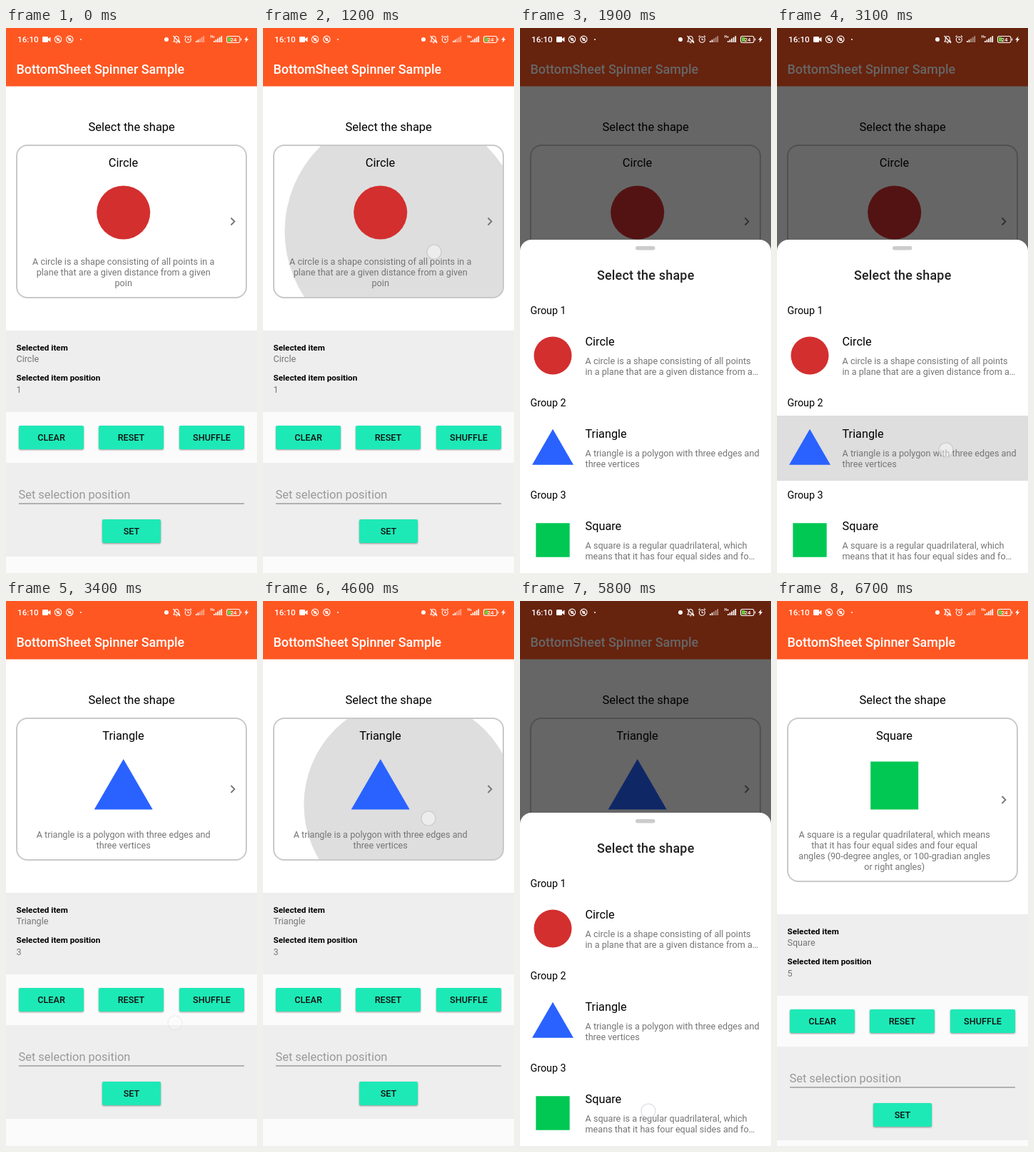
Recreate the animation shown at these times as an HTML page. Size 352 px wide and 762 px high, loop 7100 ms.

```html
<!DOCTYPE html>
<html lang="en">
<head>
<meta charset="utf-8">
<title>BottomSheet Spinner Sample</title>
<style>
  html, body { margin: 0; width: 100%; height: 100%; overflow: hidden; background: #fff; }
  svg { display: block; width: 100vw; height: 100vh; font-family: Roboto, sans-serif; }
  .button { fill: #1de9b6; filter: drop-shadow(0 1px 1.2px rgba(0, 0, 0, .4)); }
</style>
</head>
<body>
<svg id="stage" viewBox="0 0 352 762"></svg>
<script>
const LOOP = 7100;
const GREY = '#757575';
const ROW_PITCH = 129;

const items = [
  {
    name: 'Circle', position: 1,
    shape: '<circle r="37.5" fill="#d32f2f"/>',
    card: ['A circle is a shape consisting of all points in a', 'plane that are a given distance from a given', 'poin'],
    row: ['A circle is a shape consisting of all points', 'in a plane that are a given distance from a…']
  },
  {
    name: 'Triangle', position: 3,
    shape: '<path d="M0-37L41 33.5H-41z" fill="#2962ff"/>',
    card: ['A triangle is a polygon with three edges and', 'three vertices'],
    row: ['A triangle is a polygon with three edges and', 'three vertices']
  },
  {
    name: 'Square', position: 5,
    shape: '<path d="M-33.5-33.5h67v67h-67z" fill="#00c853"/>',
    card: ['A square is a regular quadrilateral, which means', 'that it has four equal sides and four equal',
      'angles (90-degree angles, or 100-gradian angles', 'or right angles)'],
    row: ['A square is a regular quadrilateral, which', 'means that it has four equal sides and fo…']
  }
];

const cardBox = item => ({ x: 15, y: 164, w: 322, h: 168 + 15 * item.card.length });
const rowBox = index => ({ x: 0, y: 413 + ROW_PITCH * index, w: 352, h: 91 });

const touches = [
  { x: 240, y: 313, from: 1100, to: 1290 },
  { x: 237, y: 590, from: 2500, to: 4500, fadeAt: 3300 },
  { x: 232, y: 304, from: 4500, to: 4690 },
  { x: 180, y: 713, from: 5700, to: 5960 }
];

const ripples = [
  { id: 'card0', touch: touches[0], box: cardBox(items[0]), start: 1105, release: 1305 },
  { id: 'row1', touch: touches[1], box: rowBox(1), start: 2590, release: 3220 },
  { id: 'card1', touch: touches[2], box: cardBox(items[1]), start: 4540, release: 4740 },
  { id: 'row2', touch: touches[3], box: rowBox(2), start: 5810, release: 5900 }
];

const sheetVisits = [{ open: 1230, close: 3210 }, { open: 4667, close: 5815 }];

// y is the middle of the capitals.
function text(content, x, y, size, { color = '#000', weight = 400, anchor = 'start', spacing = 0 } = {}) {
  return `<text x="${x}" y="${y + size * .355}" font-size="${size}" font-weight="${weight}" fill="${color}"
    text-anchor="${anchor}" letter-spacing="${spacing}">${content}</text>`;
}

function rect(x, y, w, h, fill, extra = '') {
  return `<rect x="${x}" y="${y}" width="${w}" height="${h}" fill="${fill}" ${extra}/>`;
}

function rippleLayer(id, { x, y, w, h }, radius = 0) {
  return `<clipPath id="${id}-clip">${rect(x, y, w, h, '#000', `rx="${radius}"`)}</clipPath>
    <g clip-path="url(#${id}-clip)"><circle id="${id}" opacity="0"/></g>`;
}

function button(label, x, y, w) {
  return `<rect class="button" x="${x}" y="${y}" width="${w}" height="33" rx="2"/>` +
    text(label, x + w / 2, y + 17, 12.65, { weight: 500, anchor: 'middle', color: '#111' });
}

function page(item, index) {
  const box = cardBox(item);
  const middle = box.y + box.h / 2;
  const centered = { anchor: 'middle' };
  return `<g id="page${index}">
    ${rippleLayer('card' + index, box, 15)}
    ${rect(box.x, box.y, box.w, box.h, 'none', 'rx="15" stroke="#c9c9c9" stroke-width="2"')}
    ${text(item.name, 164.5, 188, 16.4, centered)}
    <g transform="translate(164.7 258)">${item.shape}</g>
    ${item.card.map((line, i) => text(line, 164.7, 326.5 + 15 * i, 12.65, { ...centered, color: GREY })).join('')}
    <path d="M315.5 ${middle - 5}l5 5-5 5" fill="none" stroke="${GREY}" stroke-width="1.8"/>
    <g transform="translate(0 ${box.h - 213})">
      ${rect(0, 423, 352, 400, '#fbfbfb')}
      ${rect(0, 423, 352, 114, '#eee')}
      ${text('Selected item', 14.5, 446.5, 11.7, { weight: 700 })}
      ${text(item.name, 14.5, 463, 12.55, { color: GREY })}
      ${text('Selected item position', 14.5, 489, 11.7, { weight: 700 })}
      ${text(item.position, 14.5, 505.5, 12.55, { color: GREY })}
      ${button('CLEAR', 18, 556, 91)}${button('RESET', 130, 556, 91)}${button('SHUFFLE', 243, 556, 91)}
      ${rect(0, 608, 352, 131, '#eee')}
      ${text('Set selection position', 17.5, 652, 16.4, { color: '#999' })}
      ${rect(18, 664.5, 316, 1, '#777')}
      ${button('SET', 135, 687, 82)}
    </g>
  </g>`;
}

function sheetRow(item, index) {
  const y = ROW_PITCH * index;
  return rippleLayer('row' + index, rowBox(index)) +
    text('Group ' + (index + 1), 14.5, 394.5 + y, 14.3) +
    `<g transform="translate(46 ${458 + y}) scale(.707)">${item.shape}</g>` +
    text(item.name, 91.5, 438.5 + y, 16.3) +
    item.row.map((line, i) => text(line, 91.5, 465.5 + y + 15 * i, 12.65, { color: GREY })).join('');
}

function signalBars(x) {
  return [0, 1, 2, 3, 4].map(i =>
    rect(x + 2.6 * i, 18 - 1.7 * i, 1.7, 2 + 1.7 * i, '#fff', `opacity="${x < 280 && i > 1 ? .5 : 1}"`)).join('');
}

function statusBar() {
  const ring = x => `<circle cx="${x}" cy="15.8" r="4.7"/><circle cx="${x}" cy="15.8" r="1.6"/><path d="M${x - 3} 12.8l6 6"/>`;
  return text('16:10', 16, 16, 11.7, { color: '#fff', weight: 500 }) +
    rect(51, 12, 8, 8, '#fff', 'rx="1.2"') +
    `<path d="M59 15l3.5-2.5v7L59 17z" fill="#fff"/>
    <circle cx="105" cy="16" r="1" fill="#fff"/>
    <circle cx="225" cy="16" r="3" fill="#fff"/>
    <g fill="none" stroke="#fff" stroke-width="1.1">
      ${ring(73)}${ring(89.3)}
      <path d="M235 19h8.500l-1.300-2v-2.500a3 3 0 0 0-6 0V17zM238 20.800h2.500M234.500 11l9.500 10"/>
      <circle cx="255.300" cy="16.300" r="4"/><path d="M255.300 14v2.500h2M250.500 12.500l2-1.800M260 12.500l-2-1.800"/>
      <rect x="309.500" y="11.500" width="18.500" height="9" rx="2.500"/>
      <path d="M329.700 14.500v3"/>
    </g>` +
    signalBars(266) + signalBars(291) +
    text('H+', 286.5, 12.5, 5, { color: '#fff', weight: 700 }) +
    rect(311, 13, 4.5, 6, '#5fd03a', 'rx="1"') +
    text('24', 319, 16, 8, { color: '#fff', weight: 500, anchor: 'middle' }) +
    '<path d="M338.500 11.500l-4.500 5h2.600l-1 4 4.600-5.200h-2.700z" fill="#fff"/>';
}

const centerBold = { anchor: 'middle', weight: 500, color: '#212121', spacing: .22 };
const $ = id => document.getElementById(id);

$('stage').innerHTML =
  rect(0, 0, 352, 762, '#fff') +
  rect(0, 0, 352, 81.5, '#ff5722') +
  text('BottomSheet Spinner Sample', 14.5, 57.3, 17.93, { color: '#fff', weight: 500 }) +
  text('Select the shape', 176.2, 138, 16.5, { anchor: 'middle' }) +
  items.map(page).join('') +
  rect(0, 0, 352, 762, '#000', 'id="dim"') +
  statusBar() +
  `<g id="sheet">
    <path d="M0 800V312a16 16 0 0 1 16-16H336a16 16 0 0 1 16 16V800z" fill="#fff"/>
    ${rect(162, 305, 27.5, 5.5, '#ccc', 'rx="2.7"')}
    ${text('Select the shape', 176.2, 345.5, 17.93, centerBold)}
    ${items.map(sheetRow).join('')}
  </g>
  <circle id="touch" r="10" fill="#fff" fill-opacity=".45" stroke="#8a8aa8" stroke-opacity=".3" stroke-width="1.2"/>`;

const clamp = v => Math.min(1, Math.max(0, v));
const easeInOut = v => (1 - Math.cos(Math.PI * v)) / 2;
const easeOut = v => 1 - (1 - v) ** 2;
const mix = (a, b, v) => a + (b - a) * v;

function set(id, attributes) {
  for (const name in attributes) $(id).setAttribute(name, attributes[name]);
}

function drawRipple({ id, touch, box, start, release }, time) {
  const grow = easeOut(clamp((time - start) / 225));
  const fade = clamp((time - release) / 150);
  set(id, {
    cx: mix(touch.x, box.x + box.w / 2, grow),
    cy: mix(touch.y, box.y + box.h / 2, grow),
    r: mix(.35 * box.w, Math.hypot(box.w, box.h) / 2, grow),
    opacity: time > start ? .13 * (1 - fade) : 0
  });
}

function draw(time) {
  const selected = sheetVisits.filter(visit => time >= visit.close).length;
  items.forEach((_, i) => set('page' + i, { visibility: i === selected ? 'visible' : 'hidden' }));

  let shown = 0, dim = 0;
  for (const { open, close } of sheetVisits) {
    if (time < open) continue;
    const leaving = clamp((time - close) / 180);
    shown += easeInOut(clamp((time - open) / 250)) - easeInOut(leaving);
    dim += clamp((time - open) / 200) - leaving;
  }
  set('dim', { opacity: .6 * dim });
  set('sheet', { opacity: shown, transform: `translate(0 ${152 * (1 - shown)})` });

  ripples.forEach(ripple => drawRipple(ripple, time));

  const touch = touches.find(({ from, to }) => time >= from && time < to);
  set('touch', touch
    ? { cx: touch.x, cy: touch.y, opacity: time > touch.fadeAt ? .4 : 1 }
    : { opacity: 0 });
}

const began = performance.now();
function tick() {
  draw((performance.now() - began) % LOOP);
  requestAnimationFrame(tick);
}
tick();
</script>
</body>
</html>
```
